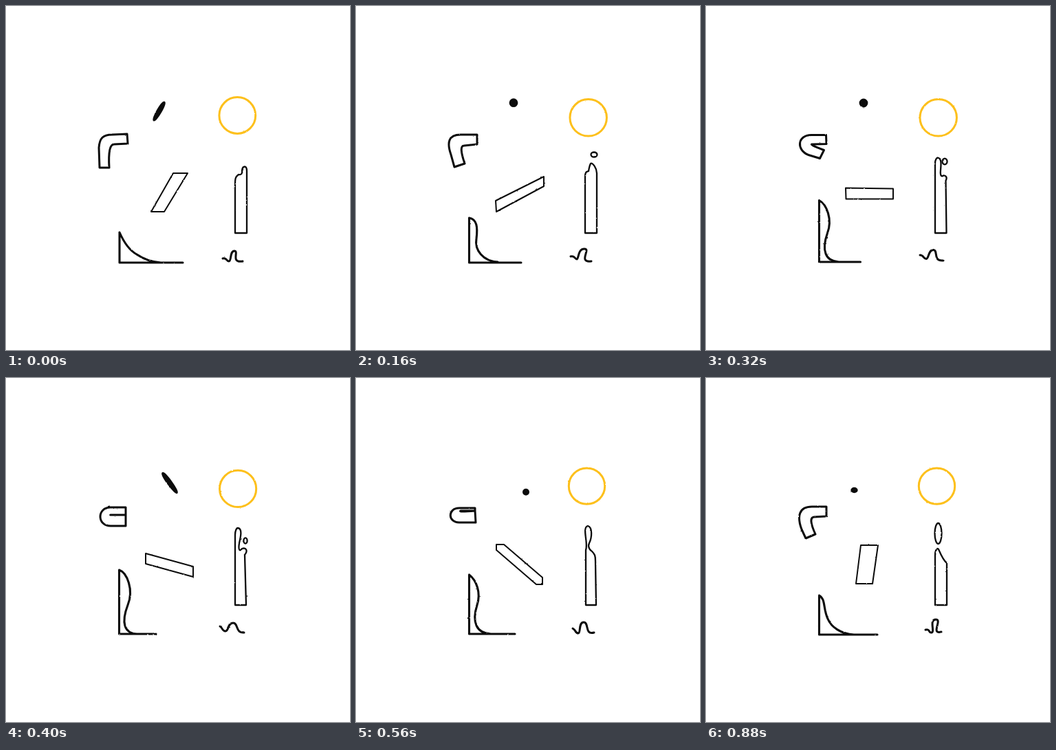
Recreate the animation shown at these times as an HTML page. Size 500 by 500 pixels, loop 960 ms.

```html
<!DOCTYPE html>
<html lang="en">
<head>
<meta charset="utf-8">
<title>Sketched shapes</title>
<style>
html, body { margin: 0; width: 100%; height: 100%; overflow: hidden; background: #fff; }
svg { display: block; width: 100%; height: 100%; }
</style>
</head>
<body>
<svg viewBox="0 0 500 500">
  <filter id="pencil" filterUnits="userSpaceOnUse" x="0" y="0" width="500" height="500" color-interpolation-filters="sRGB">
    <feTurbulence type="fractalNoise" baseFrequency=".25" numOctaves="2"/>
    <feDisplacementMap in="SourceGraphic" scale="1.8" xChannelSelector="R" yChannelSelector="G"/>
    <feGaussianBlur stdDeviation=".4"/>
  </filter>
  <g id="stage" filter="url(#pencil)" fill="none" stroke-linecap="round" stroke-linejoin="round"></g>
</svg>
<script>
const STEPS = 12, STEP_MS = 80, INK = '#0c0c0c', SUN = '#fdc01c';
const NUMBER = /-?\d+(\.\d+)?/g;

function oval(x, y, rx, ry = rx, tilt = 0) {
  const a = tilt * Math.PI / 180, dx = rx * Math.cos(a), dy = rx * Math.sin(a);
  const arc = `A${rx} ${ry} ${tilt} 1 0 `;
  return `M${x - dx} ${y - dy}${arc}${x + dx} ${y + dy}${arc}${x - dx} ${y - dy}Z`;
}

// Poses are keyed by step; steps without a key are blended from their neighbours.
const sun = Array.from({ length: STEPS }, (_, k) => {
  const s = Math.sin(k / STEPS * 2 * Math.PI);
  return oval(336.3 + 1.6 * s, 159 + 3.8 * s, 26.4 + 0.4 * s);
});

const dot = {
  0: oval(222.5, 153, 15.5, 3, -60),
  1: oval(229, 140.5, 5.4),
  4: oval(229, 141, 5.4),
  5: oval(238, 152.5, 18, 3, 54),
  6: oval(247, 166, 4),
  8: oval(247, 165.5, 4),
  9: oval(232.5, 164, 19, 3, 2),
  10: oval(215.5, 163, 4.2, 3.2),
  11: oval(215.5, 163, 4.2, 3.2)
};

const elbow = {
  0: 'M176 186L177 200L157 201Q148 201 150 235L136 235L135 206C136 192 141 187 154 187Z',
  2: 'M176 187L176 201L157 203Q149 203 158 229L143 234L138 216C132 199 134 187 152 187Z',
  3: 'M175 187L176 202L158 203Q147 202 169 220L157 228L146 218C129 203 134 187 154 187Z',
  5: 'M174 188L174 199L152 199Q149 199 174 199L174 215L152 215C132 215 132 188 152 188Z',
  7: 'M173 189L173 193L152 193Q148 195 173 193L174 210L150 210C133 210 133 189 150 189Z',
  9: 'M175 189L175 202L156 205Q153 206 169 203L169 214L152 214C133 213 132 190 154 189Z',
  11: 'M175 187L175 201L157 202Q148 203 159 227L145 233L139 220C132 201 135 187 154 187Z'
};

const slab = {
  0: 'M243 243L264 243L230 299L211 299Z',
  1: 'M204 300L204 289L259 243L272 243L272 252L215 300Z',
  2: 'M203 283L273 248L273 262L204 299Z',
  3: 'M203 274L272 257L272 272L204 291Z',
  5: 'M203 255L272 274L272 289L203 270Z',
  6: 'M203 246L272 281L272 297L203 262Z',
  7: 'M204 250L204 242L215 242L271 290L271 300L262 300Z',
  8: 'M206 242L225 242L269 300L250 300Z',
  9: 'M215 243L233 243L260 300L245 300Z',
  11: 'M225 243L250 243L242 299L218 299Z'
};

const low = 'M164.5 308V373H240M164.5 308C176 310 177 322 175 338C172 355 185 371 206 372';
const high = 'M164.5 286V372H231M164.5 286C175 294 182 312 176 330C168 355 175 371 196 372';
const slope = {
  0: 'M165 329V373H257M165 329C172 345 181 356 190 361C200 368 212 372 225 373',
  2: low,
  3: high,
  5: 'M164.5 279V372H218M164.5 279C176 283 186 308 177 330C167 356 172 371 190 372',
  7: high,
  9: low,
  11: 'M164.5 316V373H249M164.5 316C174 321 170 335 177 350C182 362 196 372 215 373'
};

const stub = 'M334 329V249C334 245 338 245 340 250C341 256 349 262 349 270V329Z';
const candle = {
  0: 'M333 330V258C333 250 334 248 338 245C342 246 344 243 343 239C344 232 350 231 350 240V330Z',
  2: 'M333 330V248C333 240 336 241 338 240C339 234 340 231 341 229C344 227 350 236 350 243V330Z',
  3: 'M333 330V230C333 225 335 223 337 223C342 225 342 232 343 237C343 243 345 245 347 245C349 246 350 248 350 251L350 330Z',
  5: 'M333 330V228C333 222 335 218 337 218C344 219 341 231 339 240C337 253 341 251 343 248C349 246 352 251 347 257L349 330Z',
  7: 'M334 330V250C338 240 328 217 337 215C344 217 343 232 339 240C336 246 341 251 343 252C347 256 348 258 348 266L349 330Z',
  8: stub,
  9: stub,
  11: 'M333 330V258C333 250 336 246 338 249C341 256 346 266 350 269V330Z'
};

const drop = {
  0: '',
  1: oval(347, 223, 4),
  2: oval(346, 216, 4.5, 3.5),
  3: oval(346, 215.5, 4.5),
  5: oval(348, 236.5, 2.6, 4.2),
  6: '',
  7: '',
  8: oval(337, 220, 5, 8),
  9: oval(336.5, 220, 6, 9),
  11: oval(337.5, 226, 5, 15)
};

const squiggle = {
  0: 'M315 367C321 365 320 371 324 371S325 356 332 356S326 374 344 371',
  2: 'M312 364C318 362 318 368 321 368S322 353 332 353S322 373 342 371',
  3: 'M311 363C318 361 318 367 321 367S324 353 331 353S325 372 344 370',
  5: 'M311 361C315 363 314 368 319 368S322 356 330 356S333 371 346 370',
  7: 'M315 364C320 367 319 371 323 371S323 355 331 355S332 374 346 370',
  9: 'M318 366C325 364 322 371 327 370S323 351 333 351S325 373 341 369',
  11: 'M319 366C326 364 323 371 328 370S324 351 334 351S326 373 342 369'
};

function blend(from, to, u) {
  const targets = to.match(NUMBER);
  let i = 0;
  return from.replace(NUMBER, n => +n + (targets[i++] - n) * u);
}

function pose(keys, k) {
  if (k in keys) return keys[k];
  let a = k, b = k;
  while (!(a in keys)) a--;
  while (!(b % STEPS in keys)) b++;
  return blend(keys[a], keys[b % STEPS], (k - a) / (b - a));
}

const stage = document.getElementById('stage');
const noise = document.querySelector('feTurbulence');

function addPart(keys, width, stroke = INK, fill = 'none') {
  const path = document.createElementNS('http://www.w3.org/2000/svg', 'path');
  path.setAttribute('stroke', stroke);
  path.setAttribute('stroke-width', width);
  path.setAttribute('fill', fill);
  stage.append(path);
  return { path, keys };
}

const parts = [
  addPart(sun, 3, SUN),
  addPart(dot, 2, INK, INK),
  addPart(elbow, 3),
  addPart(slab, 2),
  addPart(slope, 3.1),
  addPart(candle, 2.3),
  addPart(drop, 2.3),
  addPart(squiggle, 3)
];

let shown = -1;
function draw() {
  const k = Math.floor(performance.now() / STEP_MS) % STEPS;
  if (k !== shown) {
    shown = k;
    noise.setAttribute('seed', k + 1);
    for (const { path, keys } of parts) path.setAttribute('d', pose(keys, k));
  }
  requestAnimationFrame(draw);
}
draw();
</script>
</body>
</html>
```
